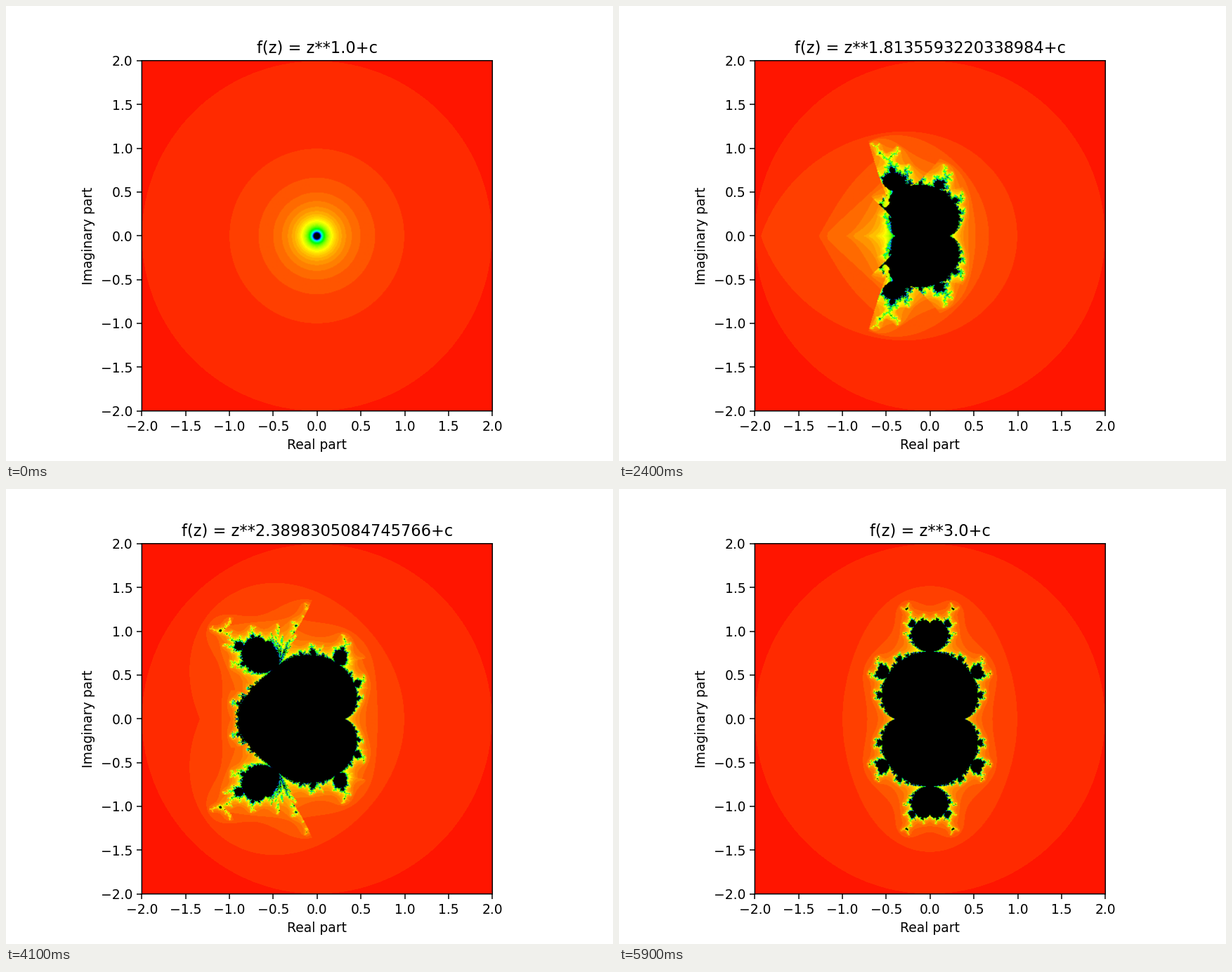
Write a matplotlib script that moves like this. It is 864 px wide and 648 px high and loops after 6 s.

```python
import numpy as np
import matplotlib.pyplot as plt
from matplotlib.animation import FuncAnimation
from matplotlib.colors import LinearSegmentedColormap

FRAMES = 60
INTERVAL = 100
MAX_ITER = 60
SIZE = 500
LIMIT = 2.0
START, END = 1, 3

index = np.arange(FRAMES)
last = FRAMES - 1
powers = START * ((last - index) / last) + END * (index / last)

axis = np.linspace(-LIMIT, LIMIT, SIZE)
half_re, half_im = (a.ravel() for a in np.meshgrid(axis, axis[SIZE // 2:]))


def escape_counts(p):
    """Steps until |z| > 2 for z -> z**p + c, on the upper half plane."""
    counts = np.full(half_re.size, MAX_ITER, dtype=np.uint8)
    live = np.arange(half_re.size)
    cx, cy = half_re, half_im
    x, y = cx, cy
    for n in range(1, MAX_ITER):
        r2 = x * x + y * y
        out = r2 > LIMIT ** 2
        counts[live[out]] = n
        keep = ~out
        live, cx, cy, x, y, r2 = (a[keep] for a in (live, cx, cy, x, y, r2))
        if live.size == 0:
            break
        radius = r2 ** (p / 2)
        angle = p * np.arctan2(y, x)
        new_x = radius * np.cos(angle) + cx
        new_y = radius * np.sin(angle) + cy
        if n % 6 == 0:
            # points settled on an attracting fixed point never escape
            step = (new_x - x) ** 2 + (new_y - y) ** 2
            moving = (step > 1e-8) | (p * p * r2 ** (p - 1) > 0.97)
            live, cx, cy, new_x, new_y = (
                a[moving] for a in (live, cx, cy, new_x, new_y))
        x, y = new_x, new_y
    return counts.reshape(SIZE // 2, SIZE)


def full_plane(half):
    return np.vstack([half[::-1], half]).astype(np.float32)


halves = [escape_counts(p) for p in powers]

rainbow = LinearSegmentedColormap.from_list(
    "escape", ["red", "yellow", "lime", "cyan", "blue", "black"],
    N=20 * MAX_ITER + 1)

fig, ax = plt.subplots(figsize=(6.4, 4.8), dpi=135)
# blend colours rather than counts, so no false rim appears around the set
image = ax.imshow(full_plane(halves[0]), cmap=rainbow, vmin=0, vmax=MAX_ITER,
                  origin="lower", extent=(-LIMIT, LIMIT, -LIMIT, LIMIT),
                  interpolation_stage="rgba")
ticks = np.arange(-LIMIT, LIMIT + 0.1, 0.5)
ax.set_xticks(ticks)
ax.set_yticks(ticks)
ax.set_xlabel("Real part")
ax.set_ylabel("Imaginary part")
title = ax.set_title("")
plt.setp(list(ax.spines.values()), snap=False)


def update(i):
    image.set_data(full_plane(halves[i]))
    title.set_text(f"f(z) = z**{powers[i]}+c")
    return image, title


anim = FuncAnimation(fig, update, frames=FRAMES, interval=INTERVAL,
                     repeat=True, repeat_delay=0)
plt.show()
```
